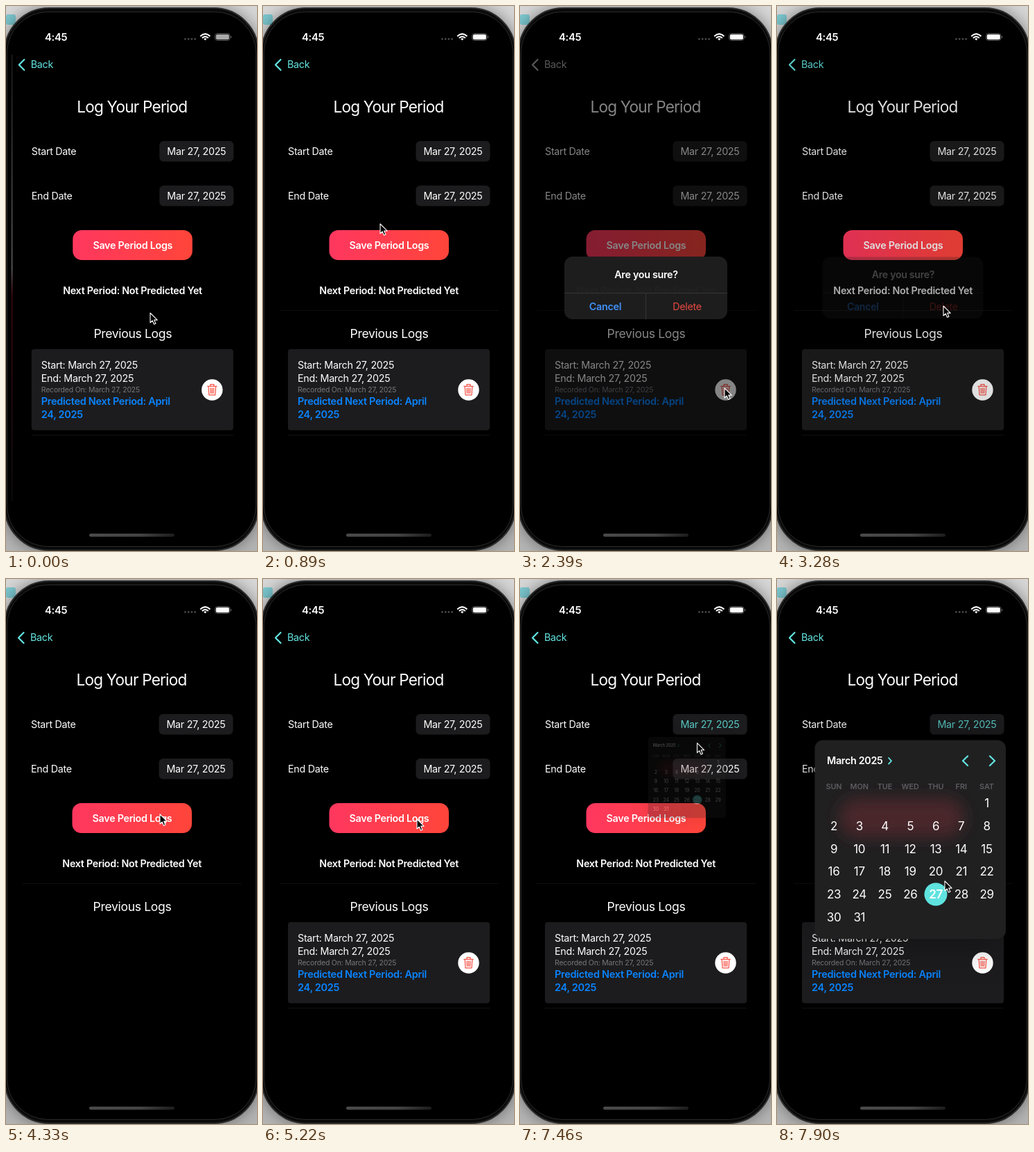
Write an HTML page that moves like this. It is 362 px wide and 783 px high and loops after 8000 ms.

```html
<!DOCTYPE html>
<html lang="en">
<head>
<meta charset="utf-8">
<title>Period log</title>
<style>
  html, body { margin: 0; width: 100%; height: 100%; overflow: hidden; background: #000; }
  svg { display: block; }
  text { font: 14.3px Inter, Roboto, sans-serif; letter-spacing: -.02em; fill: #fff; white-space: pre; }
  .mid { text-anchor: middle; }
  .bold { font-weight: 600; }
  .title { font-size: 22.6px; letter-spacing: -.035em; }
  .head { font-size: 17.6px; }
  .note { font-size: 10.5px; fill: #77777c; }
  .link { font-size: 14.5px; fill: #0a84ff; }
  .week { font-size: 10.8px; letter-spacing: 0; fill: #5c5c60; }
  .day { font-size: 17px; }
  .line { fill: none; stroke-linecap: round; stroke-linejoin: round; }
</style>
</head>
<body>
<svg width="362" height="783" viewBox="0 0 362 783">
  <defs>
    <linearGradient id="desk" x2="0" y2="1"><stop stop-color="#d6d6d6"/><stop offset="1" stop-color="#b4b4b4"/></linearGradient>
    <linearGradient id="warm"><stop stop-color="#ff375f"/><stop offset="1" stop-color="#ff453a"/></linearGradient>
    <linearGradient id="bar"><stop stop-color="#4a4a4a"/><stop offset=".6" stop-color="#444"/><stop offset="1" stop-color="#1c1c1c"/></linearGradient>
    <linearGradient id="sliver" x2="0" y2="1">
      <stop stop-color="#222"/><stop offset=".48" stop-color="#777"/>
      <stop offset=".54" stop-color="#500a18"/><stop offset="1" stop-color="#111"/>
    </linearGradient>
    <filter id="soft" x="-50%" y="-50%" width="200%" height="200%"><feGaussianBlur stdDeviation="11"/></filter>
    <filter id="wide" x="-50%" y="-50%" width="200%" height="200%"><feGaussianBlur stdDeviation="32"/></filter>
  </defs>

  <rect width="362" height="783" fill="url(#desk)"/>
  <rect y="12" width="14" height="15" rx="3" fill="#7cc6ce"/>
  <rect x="-2" y="3" width="366" height="779" rx="64" opacity=".45" filter="url(#soft)"/>
  <rect x="-2" y="3" width="366" height="779" rx="64" fill="#0a0a0a" stroke="#2c2c2c" stroke-width="2"/>
  <rect x="1.5" y="8.5" width="359" height="768" rx="59" fill="#000" stroke="#2a2a2a"/>
  <rect id="edge" x="8" y="70" width="1.2" height="641" fill="url(#sliver)"/>

  <g id="page">
    <g id="back">
      <path class="line" d="M25.5 77 18 84.5 25.5 92" stroke="currentColor" stroke-width="2.2"/>
      <text x="35" y="89" style="fill:currentColor">Back</text>
    </g>
    <text class="mid title" x="181" y="153">Log Your Period</text>
    <text x="36" y="214">Start Date</text>
    <text x="36" y="278">End Date</text>
    <rect x="220.5" y="194" width="107" height="29.5" rx="6" fill="#1c1c1e"/>
    <rect x="220.5" y="258" width="107" height="29.5" rx="6" fill="#1c1c1e"/>
    <text id="start" class="mid" x="274" y="214">Mar 27, 2025</text>
    <text class="mid" x="274" y="278">Mar 27, 2025</text>
    <rect x="95.5" y="322" width="172.5" height="43" rx="13" fill="url(#warm)"/>
    <text class="mid bold" x="182" y="349">Save Period Logs</text>
    <text class="mid bold" x="181.7" y="413.7">Next Period: Not Predicted Yet</text>
    <path id="rule" d="M24 437.5H340" stroke="#0f0f11"/>
    <text class="mid head" x="182" y="476.7">Previous Logs</text>
    <g id="card">
      <rect x="36" y="493" width="291" height="116.5" rx="4" fill="#1c1c1e"/>
      <path d="M36 616.5H327" stroke="#111113"/>
      <text x="50" y="521">Start: March 27, 2025</text>
      <text x="50" y="540">End: March 27, 2025</text>
      <text class="note" x="50" y="555">Recorded On: March 27, 2025</text>
      <text class="link bold" x="50" y="573.3">Predicted Next Period: April</text>
      <text class="link bold" x="50" y="592.3">24, 2025</text>
      <circle cx="296.5" cy="551.5" r="15.2" fill="#fff"/>
      <path class="line" stroke="#f8574c" stroke-width="1.3"
        d="M289.8 546.3H303.2M294 546V543.6H299V546M291.2 546.5 292 558.8H301L301.8 546.5M294.2 549 294.5 556.3M296.5 549V556.3M298.8 549 298.5 556.3"/>
    </g>
  </g>

  <rect id="dim" x="3" y="10" width="356" height="765" rx="56"/>

  <g id="alert">
    <rect x="64" y="360" width="235" height="90" rx="12" fill="#1e1e1f" fill-opacity=".97"/>
    <path d="M64 412.5H299M181.5 412.5V450" stroke="#353537"/>
    <text class="mid bold" x="182" y="391">Are you sure?</text>
    <text class="mid bold" x="123" y="437" style="fill:#4090f7">Cancel</text>
    <text class="mid" x="241" y="437" style="fill:#e9493f">Delete</text>
  </g>

  <g id="picker">
    <rect x="54" y="231" width="276" height="286" opacity=".4" filter="url(#wide)"/>
    <rect x="54.5" y="231.5" width="275.5" height="285.5" rx="12" fill="#202021"/>
    <rect x="90" y="315" width="180" height="56" rx="26" fill="#4a2529" filter="url(#soft)"/>
    <text class="bold" x="72" y="266.3">March 2025</text>
    <g class="line" stroke="#63e6e2">
      <path d="M161 257 165 261.3 161 265.6" stroke-width="1.8"/>
      <path d="M275 254.5 268 261.3 275 268M307 254.5 314 261.3 307 268" stroke-width="2.2"/>
    </g>
    <circle cx="229" cy="453" r="16.5" fill="#5fe3df"/>
    <g id="days"></g>
  </g>

  <text class="bold" x="56" y="49.8" style="font-size:14.8px">4:45</text>
  <path class="line" d="M258.5 47.5h0m4.7 0h0m4.7 0h0m4.7 0h0" stroke="#48484a" stroke-width="2.8"/>
  <g fill="none" stroke="#fff" stroke-width="2">
    <path d="M280.2 43.4Q287.3 36.8 294.4 43.4M282.8 46.1Q287.3 42 291.8 46.1"/>
    <path d="M285.2 47.2Q287.3 45.5 289.4 47.2L287.3 49.5Z" fill="#fff" stroke="none"/>
  </g>
  <rect x="301.5" y="39.5" width="21.5" height="10" rx="3.2" fill="none" stroke="#555"/>
  <path d="M324.5 43v3.2" stroke="#555" stroke-width="1.3"/>
  <rect id="battery" x="302.8" y="40.8" width="19" height="7.4" rx="2"/>
  <rect x="120" y="758" width="123" height="4.6" rx="2.3" fill="url(#bar)"/>

  <path id="cursor" d="M0 0V14L3.2 11 5.5 16.3 7.9 15.3 5.7 10.1H10.2Z" stroke="#fff" stroke-width="1.1" stroke-linejoin="round"/>
</svg>

<script>
const $ = id => document.getElementById(id);
const LOOP = 8000, FIRST = 290, TICK = 149.2;

// Eased 0 to 1 between ticks a and b.
function ramp(n, a, b) {
  const f = Math.min(1, Math.max(0, (n - a) / (b - a)));
  return f * f * (3 - 2 * f);
}

const glides = [
  { from: 2, to: 4, x: 169, y: 313 },
  { from: 6, to: 8, x: 276, y: 534 },
  { from: 9, to: 11, x: 295, y: 549 },    // trash
  { from: 16, to: 19, x: 240, y: 431 },   // Delete
  { from: 21, to: 27, x: 222, y: 338 },   // Save
  { from: 28, to: 30, x: 222, y: 345 },
  { from: 35, to: 36, x: 224, y: 354 },
  { from: 36, to: 43, x: 258, y: 199 },   // start date
  { from: 47, to: 51, x: 242, y: 434 },
];

function cursorAt(n) {
  let x = 208, y = 441;
  for (const g of glides) {
    const f = ramp(n, g.from, g.to);
    x += (g.x - x) * f;
    y += (g.y - y) * f;
  }
  return [x, y];
}

function label(text, x, y, cls) {
  const el = document.createElementNS("http://www.w3.org/2000/svg", "text");
  el.textContent = text;
  el.setAttribute("class", "mid " + cls);
  el.setAttribute("x", x);
  el.setAttribute("y", y);
  $("days").append(el);
}

const column = i => 82 + 36.75 * i;
"SUN MON TUE WED THU FRI SAT".split(" ").forEach((d, i) => label(d, column(i), 302, "week bold"));
for (let d = 1; d <= 31; d++) {
  const cell = d + 5;
  label(d, column(cell % 7), 328.2 + 32.7 * Math.floor(cell / 7), d === 27 ? "day bold" : "day");
}

const set = (id, name, value) => $(id).setAttribute(name, value);
const zoom = (x, y, s) => `translate(${x} ${y}) scale(${s}) translate(${-x} ${-y})`;

function draw() {
  const t = performance.now() % LOOP;
  // The picture advances in steps; the page settles in two before the first tick.
  const n = t < 170 ? -2 : t < FIRST ? -1 : Math.floor((t - FIRST) / TICK);
  const settled = ramp(n, -2, 0);
  const rise = ramp(n, 12, 14);
  const shown = rise - ramp(n, 18, 21);
  const open = ramp(n, 47, 50);

  set("page", "transform", `translate(${.8 * (1 - settled)})`);
  set("edge", "opacity", 1 - settled);
  set("rule", "opacity", settled);
  set("battery", "fill", n < -1 ? "#aaa" : "#fff");

  set("dim", "opacity", .48 * shown);
  set("alert", "opacity", shown);
  set("alert", "transform", zoom(181.5, 405, 1.1 - .1 * rise - .013 * ramp(n, 14, 16)));
  $("back").style.color = shown > .4 ? "#aaa" : "#63e6e2";

  set("card", "opacity", 1 - ramp(n, 21, 24) + ramp(n, 31, 33));

  set("picker", "opacity", open);
  set("picker", "transform", zoom(274, 224, .2 + .8 * open));
  $("start").style.fill = n >= 47 ? "#58c9c4" : "#fff";

  set("cursor", "transform", `translate(${cursorAt(n)})`);
  requestAnimationFrame(draw);
}
draw();
</script>
</body>
</html>
```
